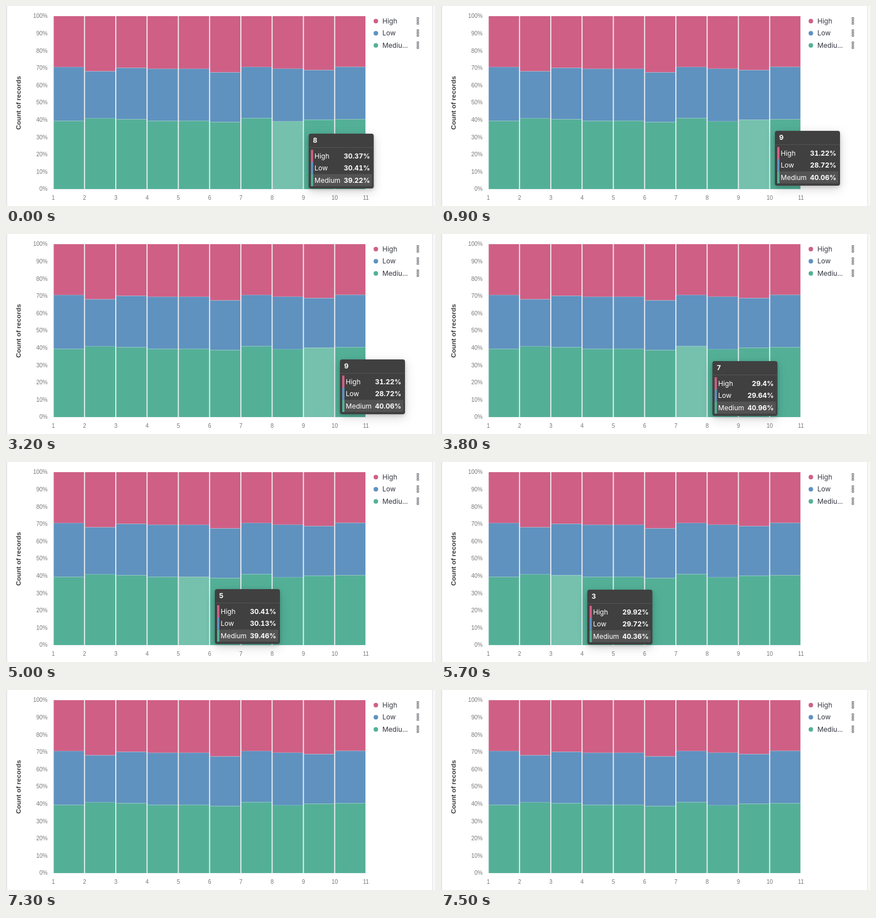
Write an HTML page that moves like this. It is 758 px wide and 354 px high and loops after 8 s.

```html
<!DOCTYPE html>
<html lang="en">
<head>
<meta charset="utf-8">
<title>Stacked percentage chart</title>
<style>
  html, body { margin: 0; width: 100%; height: 100%; overflow: hidden; background: #fff; }
  svg { display: block; width: 758px; height: 354px; }
  .axis { font: 10px "Liberation Sans", Arial, sans-serif; fill: #777; }
  .title { font: bold 11.8px "Liberation Sans", Arial, sans-serif; fill: #3c3c40; }
  .ui { font: 12px Inter, sans-serif; font-feature-settings: "tnum"; }
  .bold { font-weight: 700; }
  #tip { filter: drop-shadow(0 2px 3px rgba(0,0,0,.16)) drop-shadow(0 5px 9px rgba(0,0,0,.16)); }
</style>
</head>
<body>
<svg id="stage" viewBox="0 0 758 354"></svg>
<script>
const LOOP = 8000;
const LEFT = 83.5, TOP = 18, BOTTOM = 324, PITCH = 55.25;
const SERIES = [['High', '#cf5f85'], ['Low', '#5f92bf'], ['Medium', '#53b097']];
const LIT = '#75c1ad';

// Share of High, Low and Medium per bucket, in percent
const DATA = [
  [29.41, 31.2, 39.39], [31.87, 27.25, 40.88], [29.92, 29.72, 40.36],
  [30.43, 30.16, 39.41], [30.41, 30.13, 39.46], [32.53, 28.75, 38.72],
  [29.4, 29.64, 40.96], [30.37, 30.41, 39.22], [31.22, 28.72, 40.06],
  [29.35, 30.31, 40.35]
];

// [start ms, hovered bucket (0 = none), tooltip top]
const STEPS = [
  [0, 8, 226], [100, 9, 221], [1000, 10, 221], [2700, 9, 222], [3300, 8, 224],
  [3800, 7, 225], [4300, 6, 227], [4700, 5, 226], [5000, 5, 225],
  [5200, 4, 227], [5700, 3, 226], [6200, 2, 222], [6700, 1, 225], [7300, 0, 0]
];

const stage = document.getElementById('stage');

function add(parent, tag, attrs, text) {
  const el = document.createElementNS('http://www.w3.org/2000/svg', tag);
  for (const key in attrs) el.setAttribute(key, attrs[key]);
  if (text !== undefined) el.textContent = text;
  parent.append(el);
  return el;
}
const rect = (parent, x, y, width, height, fill, more) =>
  add(parent, 'rect', { x, y, width, height, fill, ...more });
const label = (parent, x, y, text, cls, more) =>
  add(parent, 'text', { x, y, class: cls, ...more }, text);
const yOf = percent => BOTTOM - (BOTTOM - TOP) * percent / 100;

// Panel edges
rect(stage, 0, 0, 2, 354, '#e3e4e7');
rect(stage, 753, 0, 5, 354, '#f8f9fb');
rect(stage, 753, 0, 1.5, 354, '#e6e7ea');

// Axes
rect(stage, LEFT, TOP, 552, BOTTOM - TOP + .5, '#eef0f3');
for (let p = 0; p <= 100; p += 10)
  label(stage, 73.5, yOf(p) + 3.3, p + '%', 'axis', { 'text-anchor': 'end' });
for (let i = 0; i <= 10; i++)
  label(stage, LEFT + i * PITCH, 342.5, i + 1, 'axis', { 'text-anchor': 'middle' });
label(stage, 0, 0, 'Count of records', 'title',
  { 'text-anchor': 'middle', transform: 'translate(26 171.5) rotate(-90)' });

// Bars; keep the bottom segments for highlighting
const bottoms = DATA.map(([, low, medium], i) => {
  const x = LEFT + .9 + i * PITCH, width = 53.4;
  const blueTop = yOf(low + medium), greenTop = yOf(medium);
  rect(stage, x, TOP, width, blueTop - TOP, SERIES[0][1]);
  rect(stage, x, blueTop, width, greenTop - blueTop, SERIES[1][1]);
  const bottom = rect(stage, x, greenTop, width, BOTTOM - greenTop, SERIES[2][1]);
  for (const y of [blueTop, greenTop])
    rect(stage, x, y - .5, width, 1, '#fff', { opacity: .2 });
  return bottom;
});

// Legend
['High', 'Low', 'Mediu...'].forEach((name, i) => {
  const y = 26.7 + i * 21.5;
  add(stage, 'circle', { cx: 653.5, cy: y, r: 4, fill: SERIES[i][1] });
  label(stage, 665, y + 4.1, name, 'ui', { fill: '#343741' });
  for (const dy of [-4.5, 0, 4.5])
    rect(stage, 726.3, y + dy - 1.7, 2.8, 2.8, 'none', { stroke: '#62656c', 'stroke-width': 1 });
});

// Tooltip
const tip = add(stage, 'g', { id: 'tip' });
rect(tip, 0, 0, 115, 97, '#404040', { rx: 4 });
rect(tip, 0, 24, 115, 1, '#535353');
rect(tip, 8, 71.5, 104, 21.5, '#535353');
const heading = label(tip, 7.5, 16.2, '', 'ui bold', { fill: '#fff' });
const values = SERIES.map(([name, color], i) => {
  const y = 28.5 + i * 21.5;
  rect(tip, 4, y, 4, 21.5, color);
  label(tip, 10.3, y + 15.2, name, 'ui', { fill: '#fff' });
  return label(tip, 108.5, y + 15.2, '', 'ui bold', { fill: '#fff', 'text-anchor': 'end' });
});

let shown;
function draw() {
  const time = performance.now() % LOOP;
  const step = STEPS.findLast(s => s[0] <= time);
  if (step !== shown) {
    shown = step;
    const [, bucket, top] = step;
    bottoms.forEach((el, i) => el.setAttribute('fill', i + 1 === bucket ? LIT : SERIES[2][1]));
    tip.setAttribute('visibility', bucket ? 'visible' : 'hidden');
    if (bucket) {
      tip.setAttribute('transform', `translate(${148 + (bucket - 1) * PITCH} ${top})`);
      heading.textContent = bucket;
      values.forEach((el, i) => { el.textContent = DATA[bucket - 1][i] + '%'; });
    }
  }
  requestAnimationFrame(draw);
}
draw();
</script>
</body>
</html>
```
